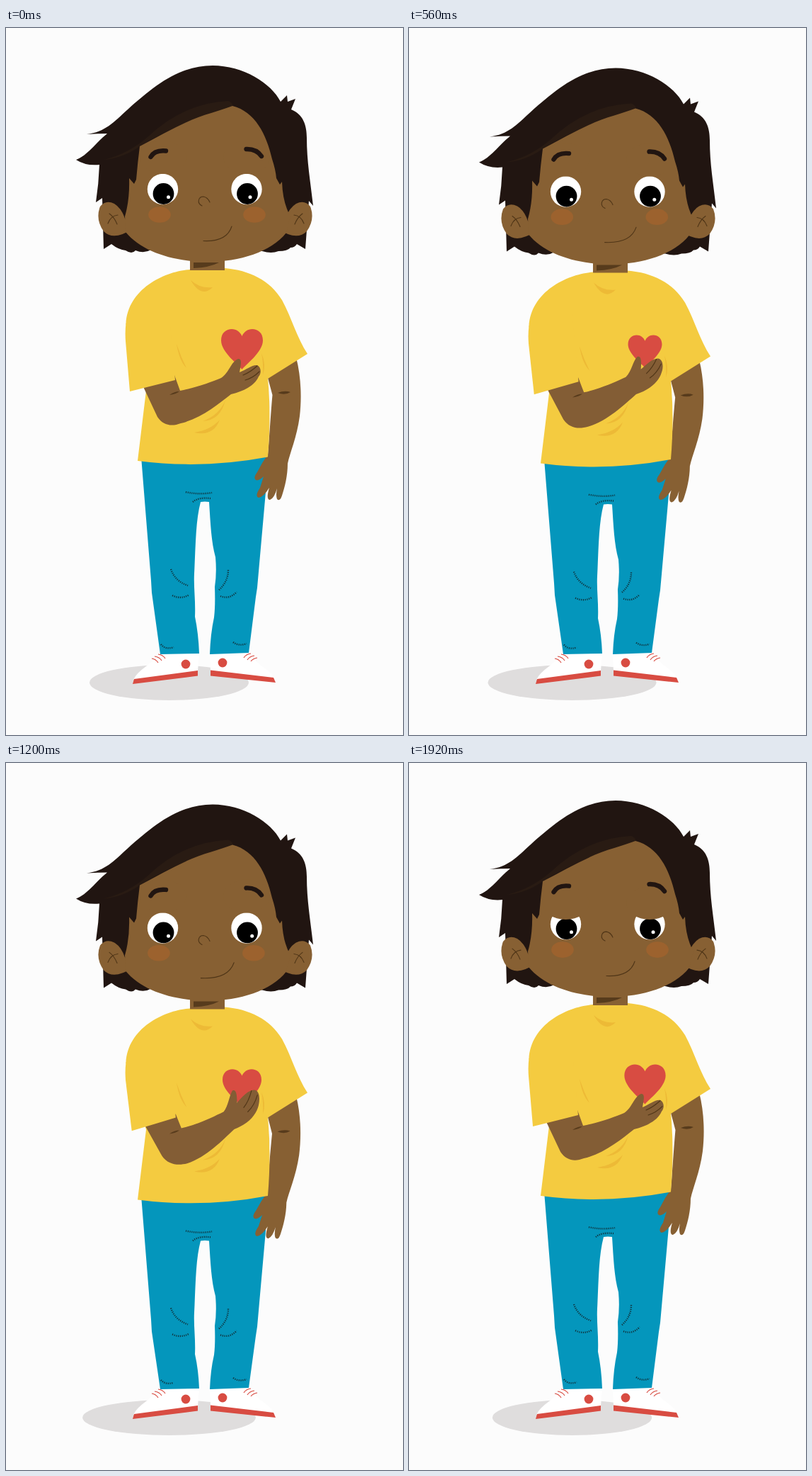
An HTML page that plays this animation: 561x998 px, repeating every 2 s.

```html
<!DOCTYPE html>
<html lang="en">
<head>
<meta charset="utf-8">
<title>Hand on heart</title>
<style>
  html, body { margin: 0; width: 100%; height: 100%; overflow: hidden; background: #fcfcfc; }
  svg { display: block; width: 100%; height: 100%; }
  .skin { fill: #876033; }
  .arm { fill: #835d35; }
  .hair { fill: #211511; }
  .shirt { fill: #f4cb40; }
  .fold { fill: #edba36; }
  .red { fill: #d84c42; }
  .dark { fill: #573b1c; }
  .line { fill: none; stroke: #4f3517; stroke-width: 1.1; stroke-linecap: round; }
  .lace { fill: none; stroke: #d84c42; stroke-width: 1.2; }
  .brow { fill: none; stroke: #211511; stroke-width: 6.4; stroke-linecap: round; }
  .crease { fill: none; stroke: #10333d; stroke-width: 2.4; stroke-dasharray: 1.2 1.6; }
</style>
</head>
<body>
<svg viewBox="0 0 561 998">
  <defs>
    <path id="ear" class="skin" d="M133 252 Q141 242 153 248 Q163 254 168 269 L178 284 Q152 301 138 287 Q126 270 133 252Z"/>
    <g id="earLines" class="line">
      <path d="M146 262 Q153 267 157 277"/>
      <path d="M158 264 Q148 265 144 276"/>
    </g>
    <g id="eye">
      <circle r="21.7" fill="#fff"/>
      <circle cx="1" cy="6.5" r="14.9"/>
    </g>
  </defs>

  <ellipse id="shadow" cx="230.5" cy="924" ry="25" fill="#dfdddd"/>

  <g id="shoes">
    <path fill="#fff" d="M217 882 L273 882 L271 908 L180 920 Q184 911 198 901 Q210 892 217 882Z"/>
    <path class="red" d="M181 919 L271 907 L271 914.5 L179 926Z"/>
    <circle class="red" cx="254" cy="898" r="6.4"/>
    <path class="lace" d="M215 884 Q222 885 225 890 M210 887 Q217 888 220 893 M206 890 Q212 891 215 896"/>
    <path fill="#fff" d="M288 881 L344 881 Q350 892 363 902 Q376 910 380 919 L289 908Z"/>
    <path class="red" d="M289 906.5 L378 917 L381 924 L289 914.5Z"/>
    <circle class="red" cx="306" cy="896" r="6.4"/>
    <path class="lace" d="M346 883 Q339 884 336 889 M351 886 Q344 887 341 892 M355 889 Q349 890 346 894"/>
  </g>

  <path id="pants" fill="#0496bc"/>
  <path id="creases" class="crease"/>

  <g id="body">
    <g id="rightArm">
      <path class="skin" d="M366 480 L410 465 C417 492 418 522 415 548 C411 578 401 600 398 615 C398 632 394 648 390 660 Q387 669 383 665 Q381 660 383 650 Q379 664 373 666 Q367 666 372 649 Q364 662 357 663 Q351 661 359 649 L364 633 Q357 640 353 638 Q349 635 355 627 Q362 613 370 602 C372 580 374 545 376.5 518 L370 494Z"/>
      <path class="dark" d="M384 515 Q394 511 402 514 Q394 519 384 515Z"/>
    </g>
    <path class="shirt" d="M260 341 C228 343 172 366 169.5 418 L198 512 L186 611 Q278 623 370 605.5 Q375 545 370 495 L426 460 C411 437 404 410 390 384 C373 356 344 342 309 339Z"/>
    <g class="fold">
      <path d="M261 356 Q274 368 292 366 Q276 382 261 356Z"/>
      <path d="M241 446 Q247 464 255 480 Q245 470 241 446Z"/>
      <path d="M361 459 Q368 475 363 490 Q364 474 361 459Z"/>
      <path d="M310 525 Q302 546 278 555 Q303 554 310 525Z"/>
      <path d="M302 553 Q290 567 266 571 Q293 577 302 553Z"/>
    </g>
    <path id="heart" class="red" d="M0 30 C-4 24 -29.5 6 -29.5 -11 C-29.5 -22 -22 -27 -14.5 -27 C-8 -27 -2.5 -23 0 -17 C2.5 -23 8 -27 14.5 -27 C22 -27 29.5 -22 29.5 -11 C29.5 6 4 24 0 30Z"/>
    <path id="foreArm" class="arm"/>
    <path id="fingers" class="line"/>
    <path class="dark" d="M231 518 Q238 513 245 513 Q240 517 231 518Z"/>
    <path id="sleeve" class="shirt"/>

    <path class="skin" d="M260 322 H309 V342 H260Z"/>
    <path class="dark" d="M265 331 H301 Q288 338 265 339Z"/>
    <path class="hair" d="M114 150 C140 147 152 133 172 115 C210 81 245 53 292 53 C335 53 375 78 388 104 L397 95 L398 104 L409 100 L403 115 C420 122 425 137 425 155 C425 188 430 215 434 251 L428 244 L423 312 L411 305 Q408 310 402 310 Q398 315 385 315 Q375 319 362 315 L205 313 Q195 319 183 314 Q178 320 169 314 Q159 313 149 305 L138 312 L136 240 L127 246 Q131 220 132 193 Q113 195 99 186 C115 180 126 163 143 149 Q130 149 114 150Z"/>
    <path fill="#291b13" d="M138 186 Q172 178 200 154 Q250 106 314 103 Q322 106 320 112 Q245 132 189 167 Q165 184 138 186Z"/>
    <use href="#ear"/>
    <use href="#ear" transform="matrix(-1 0 0 1 563 0)"/>
    <path class="skin" d="M189 167 C223 149 255 130 290 120 Q309 114 320 110 C352 118 368 150 376 185 Q381 200 382 212 L387 221 L390 217 Q391 247 402 266 L396 289 C375 316 330 330 285 330 C237 330 192 316 169 288 L168 266 Q175 242 174 212 L181 220 L184 214 Q186 190 189 167Z"/>
    <use href="#earLines"/>
    <use href="#earLines" transform="matrix(-1 0 0 1 565 0)"/>

    <use href="#eye" x="221.5" y="227.5"/>
    <use href="#eye" x="340" y="227.5"/>
    <circle cx="229.5" cy="238.7" r="2.5" fill="#fff"/>
    <circle id="glint" cy="238.7" r="2.5" fill="#fff"/>
    <g id="lids" class="skin">
      <ellipse cx="221.5" cy="227.5" rx="33" ry="23.5"/>
      <ellipse cx="340" cy="227.5" rx="33" ry="23.5"/>
    </g>
    <path class="brow" d="M204.500 182 Q210 172 226 173.500"/>
    <path class="brow" d="M339.500 171 Q354 170.500 361 181"/>
    <g id="cheeks" fill="#9c622e">
      <ellipse cx="217" cy="263.500" rx="15.800" ry="11.300"/>
      <ellipse cx="351" cy="263.500" rx="15.800" ry="11.300"/>
    </g>
    <path class="line" d="M277 251 C269 247 272 238 279 238 Q285 239 288 246"/>
    <path id="mouth" class="line"/>
  </g>
</svg>
<script>
const LOOP = 2000, STEP = 80, BOB = 6;
const part = id => document.getElementById(id);
const clamp = v => Math.max(0, Math.min(1, v));

// Blends two paths that share the same commands.
function mix(a, b, k) {
  const ends = b.match(/[\d.]+/g);
  let i = 0;
  return a.replace(/[\d.]+/g, n => (+n + (ends[i++] - n) * k).toFixed(2));
}

// Moves points down with the body; below the knees the shift fades to nothing.
const sink = (path, dy) => path.replace(/([\d.]+) ([\d.]+)/g,
  (_, x, y) => `${x} ${(+y + dy * clamp((883 - y) / 80)).toFixed(2)}`);

const PANTS = 'M191 605 L205 780 L206 797 L218 884 L273 883 Q272 855 267 831 ' +
  'C268 808 265 790 266 770 C268 730 268 695 275 669 Q281 668 287 669 ' +
  'C289 700 290 725 296 747 Q298 770 295 789 Q296 815 294 832 Q289 855 288 884 ' +
  'L343 882 L353 803 L355 790 L367 655 L367 600Z';
const CREASES = 'M254 655 Q272 659 291 656 M264 669 Q272 662 289 664 ' +
  'M233 764 Q239 781 257 787 M235 801 Q247 807 259 800 ' +
  'M314 765 Q314 782 300 794 M303 802 Q316 807 326 796 ' +
  'M219 870 Q225 878 237 874 M321 867 Q329 873 340 869';

const POSES = {
  foreArm: [
    'M190 498 L238 490 L246 512 C270 507 290 500 304 494 C316 486 317 472 328 467 ' +
    'C334 467 332 474 330 486 C340 482 348 475 355 476 C361 479 361 488 357 492 ' +
    'C352 504 338 512 318 517 C300 531 276 551 247 558 C234 563 222 561 214 549Z',
    'M192 498 L240 490 L248 510 C270 505 292 494 308 486 C314 478 315 464 319 456 ' +
    'C325 453 326 464 326 473 C333 464 342 454 350 454 C358 454 359 466 357 476 ' +
    'C354 490 343 503 323 511 C306 527 284 551 257 560 C244 563 230 562 221 549Z'],
  fingers: [
    'M355 477 Q345 486 335 490 M358 485 Q349 494 338 497',
    'M346 455 Q343 470 336 480 M355 461 Q351 477 342 486'],
  sleeve: [
    'M205 370 L169.5 417 Q168 429 169 442 L175 513 L239 497 L230 400Z',
    'M205 370 L169.5 417 Q168 429 169 442 L178 514 L240 495 L230 400Z'],
  mouth: [
    'M279 300.5 Q312 302 319 280',
    'M275 298 Q314 300 322.5 276']
};

function draw(time) {
  const t = Math.floor(time % LOOP / STEP) * STEP;
  const k = (1 - Math.cos(2 * Math.PI * t / LOOP)) / 2;
  const dy = BOB * k;
  const set = (id, name, value) => part(id).setAttribute(name, value);

  set('body', 'transform', `translate(0 ${dy})`);
  set('shadow', 'rx', 112.5 + 11 * k);
  set('pants', 'd', sink(PANTS, dy));
  set('creases', 'd', sink(CREASES, dy));
  set('rightArm', 'transform', `rotate(${0.8 * k} 392 480)`);
  for (const id in POSES) set(id, 'd', mix(...POSES[id], k));

  const beat = 0.903 + 0.097 * Math.cos(4 * Math.PI * t / LOOP);
  set('heart', 'transform', `translate(333.5 452) scale(${beat})`);

  set('glint', 'cx', 345 + 3 * k);
  set('cheeks', 'transform', `translate(${-1.2 * k} ${-0.7 * k})`);
  const open = clamp((1600 - t) / 240) + clamp((t - 1760) / 240);
  set('lids', 'transform', `translate(0 ${-45 * open})`);
}

const start = performance.now();
function tick() {
  draw(performance.now() - start);
  requestAnimationFrame(tick);
}
tick();
</script>
</body>
</html>
```
